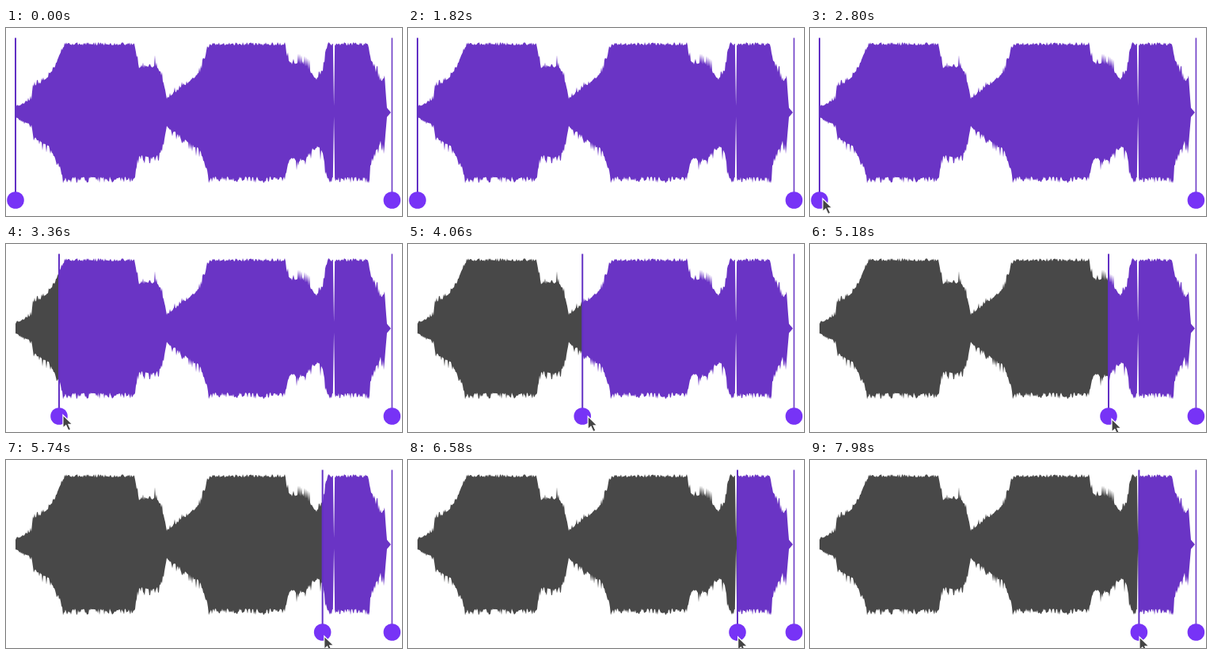
Write an HTML page that moves like this. It is 500 px wide and 238 px high and loops after 8000 ms.

```html
<!DOCTYPE html>
<html lang="en">
<head>
<meta charset="utf-8">
<title>Audio trim</title>
<style>
html, body { margin: 0; width: 100%; height: 100%; overflow: hidden; background: #fff; }
svg { display: block; width: 100%; height: 100%; }
</style>
</head>
<body>
<svg viewBox="0 0 500 238">
  <defs>
    <clipPath id="cutClip"><rect id="cutRect" width="12" height="238"/></clipPath>
    <clipPath id="keepClip"><rect id="keepRect" x="12" width="488" height="238"/></clipPath>
    <path id="wave"/>
  </defs>
  <use href="#wave" fill="#484848" clip-path="url(#cutClip)"/>
  <use href="#wave" fill="#6a34c5" clip-path="url(#keepClip)"/>
  <path fill="#fff" d="M412.8 14Q413.5 70 414.1 99Q414.6 70 415.2 14ZM412.7 198Q413.5 140 414.1 112Q414.6 140 415.2 198Z"/>
  <g transform="translate(487.4 0)">
    <path d="M0 12.5V210" stroke="#6c3ac6" stroke-width="1.6"/>
    <circle cy="218" r="10.8" fill="#7733f6"/>
  </g>
  <g id="handle">
    <path d="M0 12.5V210" stroke="#6230c4" stroke-width="2"/>
    <circle cy="218" r="10.8" fill="#7733f6"/>
  </g>
  <path id="cursor" d="M0 0V16.5L3.8 13L6.8 19.6L9.8 18.3L6.9 11.9H12Z" fill="#444" stroke="#fff" stroke-width="1.2"/>
</svg>
<script>
const $ = id => document.getElementById(id);
const LOOP = 8000, STEP = 140;
const LEFT = 12, RIGHT = 486, MID = 107, FULL = 85;

// Loudness corners as [x, half height]
const loudness = [[12,6],[32,16],[35,31],[54,43],[66,66],[74,FULL],[162,FULL],[167,56],[190,57],[197,44],[203,17],
  [214,25],[245,48],[257,FULL],[351,FULL],[358,60],[376,60],[392,41],[400,52],[406,FULL],[457,FULL],
  [461,62],[473,37],[478,42],[481,6],[RIGHT,0]];

function level(x) {
  const i = Math.max(1, loudness.findIndex(p => p[0] >= x));
  const [x0, h0] = loudness[i - 1], [x1, h1] = loudness[i];
  return h0 + (h1 - h0) * (x - x0) / (x1 - x0);
}

let seed = 41;
const rand = () => (seed = (seed * 16807) % 2147483647) / 2147483647;

// Quiet parts carry tall spikes, clipped parts only a low ripple
function edge(sign, gain, ripple) {
  const points = [];
  for (let x = LEFT; x <= RIGHT; x++) {
    const h = level(x), room = FULL + ripple - h;
    const spike = Math.min(1, h / 40) * (3 * rand() + 14 * rand() ** 4);
    const noise = x > 479 ? 0 : h > FULL - 3 ? ripple * rand() ** 1.3 : Math.min(room, spike);
    points.push(x + ' ' + (MID + sign * (h * gain + noise)).toFixed(1));
  }
  return points;
}
$('wave').setAttribute('d', 'M' + [...edge(-1, 1, 4), ...edge(1, 0.955, 8).reverse()].join('L') + 'Z');

// Monotone cubic through [time, value] keys
function track(...keys) {
  const n = keys.length;
  const slope = keys.slice(1).map((k, i) => (k[1] - keys[i][1]) / (k[0] - keys[i][0]));
  const tangent = keys.map((_, i) => {
    const a = slope[i - 1] || 0, b = slope[i] || 0;
    return a * b > 0 ? 2 * a * b / (a + b) : 0;
  });
  return t => {
    if (t <= keys[0][0]) return keys[0][1];
    if (t >= keys[n - 1][0]) return keys[n - 1][1];
    const i = keys.findIndex(k => k[0] > t) - 1;
    const [t0, v0] = keys[i], [t1, v1] = keys[i + 1];
    const d = t1 - t0, u = (t - t0) / d, w = 1 - u;
    return v0 * w * w * (1 + 2 * u) + v1 * u * u * (3 - 2 * u)
      + d * u * w * (tangent[i] * w - tangent[i + 1] * u);
  };
}

const handleX = track([2940, 12], [3360, 67], [4480, 302], [5180, 377], [6580, 416], [7420, 415.4]);
const gripX = track([1820, 100], [2800, 4], [4480, 7.5], [5180, 4], [6580, 0.6]);
const cursorY = track([1820, 242], [2800, 216], [6580, 224]);

function draw(ms) {
  const t = Math.floor(ms % LOOP / STEP) * STEP;
  const x = handleX(t);
  $('cutRect').setAttribute('width', x);
  $('keepRect').setAttribute('x', x);
  $('keepRect').setAttribute('width', 500 - x);
  $('handle').setAttribute('transform', `translate(${x} 0)`);
  $('cursor').setAttribute('transform', `translate(${x + gripX(t)} ${cursorY(t)})`);
}

const start = performance.now();
function tick() {
  draw(performance.now() - start);
  requestAnimationFrame(tick);
}
tick();
</script>
</body>
</html>
```
